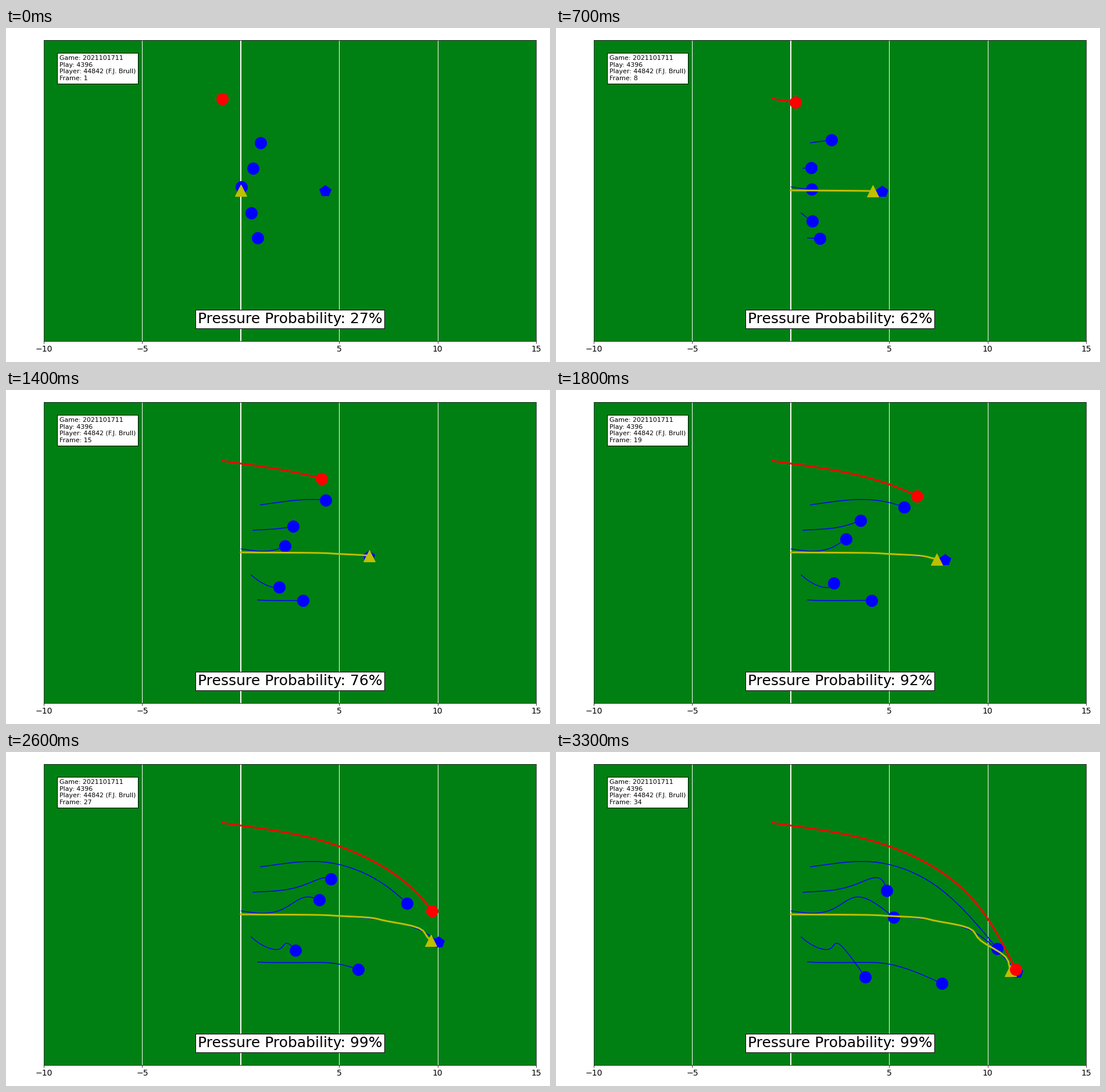
Animation, 936 px wide and 576 px high, one loop 3400 ms. Source, as a matplotlib script:

```python
import numpy as np
import matplotlib.pyplot as plt
from matplotlib.animation import FuncAnimation

W, H, DPI = 936, 576, 72
LEFT, BOTTOM, WIDTH, HEIGHT = 65, 36, 847, 519
FRAMES = 34
T = np.arange(FRAMES)

# Each route is a smooth curve through five stage positions at these times
KEYS = np.array([0, 7, 14, 22, 33])
BLOCKERS = [
    [(438, 198), (474, 193), (550, 190), (647, 226), (759, 339)],
    [(425, 242), (439, 241), (494, 235), (546, 217), (569, 239)],
    [(405, 274), (440, 278), (480, 269), (518, 250), (581, 285)],
    [(422, 319), (441, 333), (470, 340), (485, 330), (532, 388)],
    [(433, 362), (454, 363), (511, 363), (574, 366), (664, 399)],
]
PASSER = [(549, 281), (561, 282), (624, 287), (710, 306), (793, 380)]
RUSHER = [(372, 122), (412, 128), (543, 153), (686, 224), (791, 375)]
SNAP_SPOT = (404, 280)


def route(points):
    """Natural cubic spline that leaves its first point from rest."""
    p, h = np.array(points, float), np.diff(KEYS)
    d = np.diff(p, axis=0) / h[:, None]
    n = len(p)
    a, b = np.zeros((n, n)), np.zeros((n, 2))
    a[0, 0] = 1
    for i in range(1, n - 1):
        a[i, i - 1:i + 2] = 1 / h[i - 1], 2 / h[i - 1] + 2 / h[i], 1 / h[i]
        b[i] = 3 * (d[i - 1] / h[i - 1] + d[i] / h[i])
    a[-1, -2:] = 1, 2
    b[-1] = 3 * d[-1]
    m = np.linalg.solve(a, b)

    k = np.clip(np.searchsorted(KEYS, T, side="right") - 1, 0, n - 2)
    s, hk = ((T - KEYS[k]) / h[k])[:, None], h[k][:, None]
    return ((1 + 2 * s) * (1 - s) ** 2 * p[k] + s * (1 - s) ** 2 * hk * m[k]
            + s * s * (3 - 2 * s) * p[k + 1] + s * s * (s - 1) * hk * m[k + 1])


def snap(passer):
    """Ball eases from the snap to the passer's swinging hands."""
    swing = 7 * np.cos(2 * np.pi * (T - 14) / 8) - 6.5
    hands = passer + np.column_stack([swing, -0.1 * T])
    reach = 1 - (1 - np.clip(T / 10, 0, 1)) ** 2
    return SNAP_SPOT + (hands - SNAP_SPOT) * reach[:, None]


def yards(path):
    x = (path[:, 0] - LEFT) / WIDTH * 25 - 10
    y = 10 - (path[:, 1] - (H - BOTTOM - HEIGHT)) / HEIGHT * 20
    return x, y


plt.rcParams["font.family"] = "DejaVu Sans"
fig = plt.figure(figsize=(W / DPI, H / DPI), dpi=DPI)
ax = fig.add_axes([LEFT / W, BOTTOM / H, WIDTH / W, HEIGHT / H],
                  facecolor="#008013")
ax.set(xlim=(-10, 15), ylim=(-10, 10), xticks=[-10, -5, 5, 10, 15], yticks=[])
ax.tick_params(labelsize=14)
ax.grid(axis="x", color="white", lw=1)
ax.axvline(0, color="white", lw=2)

tracks = []


def add_track(path, color, marker, lw):
    x, y = yards(path)
    line, = ax.plot(x[:1], y[:1], color=color, marker=marker, ms=20, lw=lw,
                    markevery=[-1])
    tracks.append((line, x, y))


for points in BLOCKERS:
    add_track(route(points), "blue", "o", 1.5)
passer = route(PASSER)
add_track(passer, "blue", "p", 1.5)
add_track(snap(passer), "y", "^", 3)
add_track(route(RUSHER), "red", "o", 3)

box = dict(facecolor="white")
info = ax.text(-9.2, 9, "", fontsize=11, va="top", bbox=box)
title = ax.text(2.5, -9, "", fontsize=25, ha="center", va="bottom", bbox=box)


def update(i):
    for line, x, y in tracks:
        line.set_data(x[:i + 1], y[:i + 1])
    info.set_text("Game: 2021101711\nPlay: 4396\n"
                  f"Player: 44842 (F.J. Brull)\nFrame: {i + 1}")
    chance = np.interp(i, [0, 7, 14, 18, 22, 29], [27, 62, 76, 92, 98, 99])
    title.set_text(f"Pressure Probability: {chance:.0f}%")
    return [line for line, _, _ in tracks] + [info, title]


anim = FuncAnimation(fig, update, frames=FRAMES, interval=100, repeat=True)
plt.show()
```
